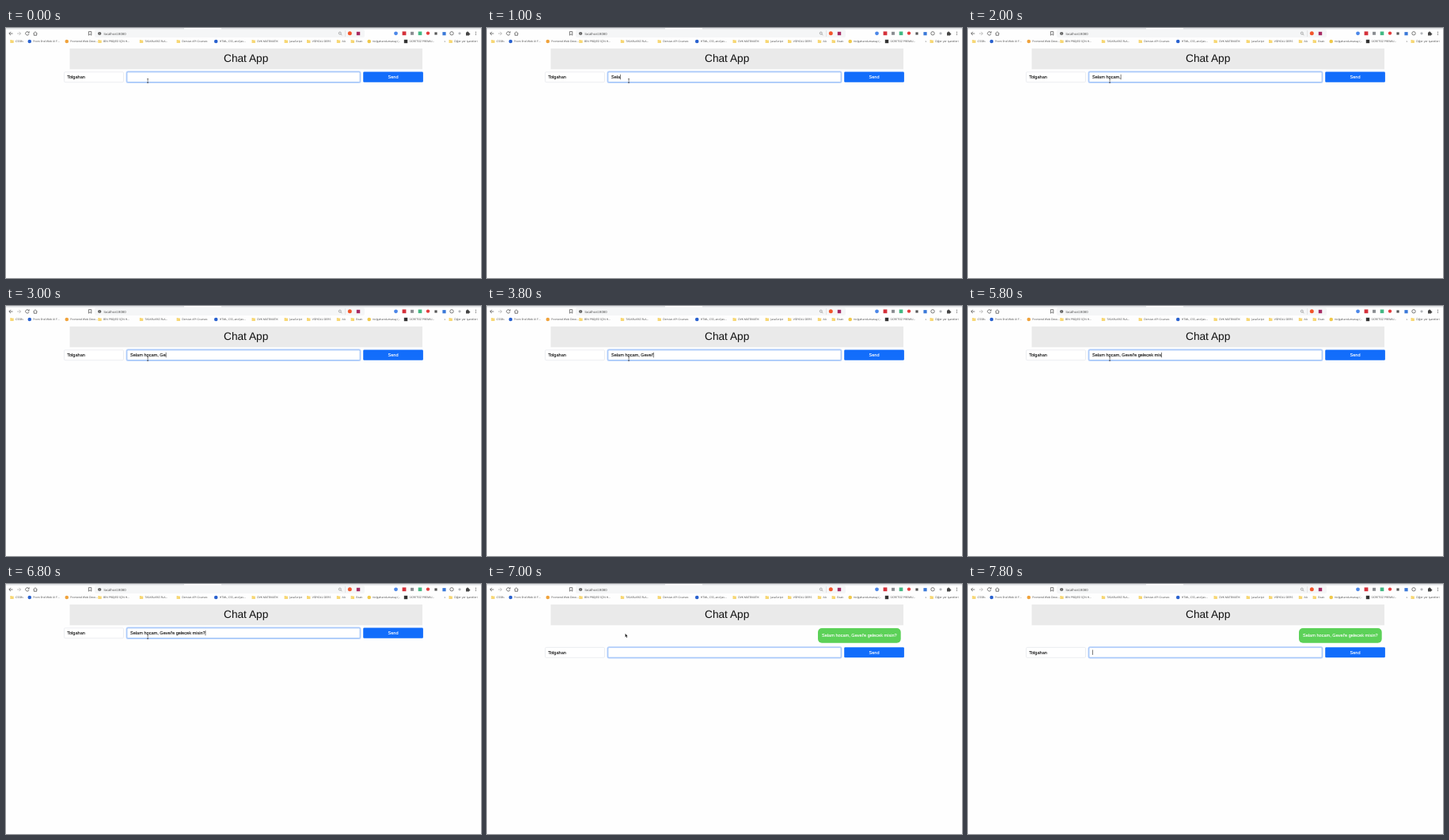
An HTML page for the animation above (8 s loop, 600x317 px).

```html
<!DOCTYPE html>
<html lang="tr">
<head>
<meta charset="utf-8">
<title>Chat App</title>
<style>
  html, body { margin: 0; width: 100%; height: 100%; overflow: hidden; background: #fefefe; }
  svg { display: block; width: 100%; height: 100%; }
  text { white-space: pre; text-rendering: geometricPrecision; }
  .app { font-family: "Liberation Sans", Arial, sans-serif; font-size: 5.6px; fill: #111; stroke: #111; stroke-width: .1px; }
  .title { font-size: 13.7px; stroke: none; }
  .light { fill: #fff; stroke: #fff; }
  .chrome { font-family: "Open Sans", "Noto Sans", sans-serif; font-size: 3.45px; fill: #444; }
  .url { font-size: 4.2px; }
  .line { fill: none; stroke: #444; stroke-width: .7px; }
</style>
</head>
<body>
<svg viewBox="0 0 600 317">
  <defs>
    <filter id="glow" x="-5%" y="-50%" width="110%" height="200%"><feGaussianBlur stdDeviation=".5"/></filter>
  </defs>
  <rect width="600" height="317" fill="#fefefe"/>
  <rect width="600" height="1.6" fill="#dfe1e5"/>
  <rect x="225" width="47" height="1.6" fill="#fff"/>
  <rect x="112" y="2" width="341" height="10" rx="2" fill="#f5f6f7"/>
  <g class="line">
    <path d="M8.5 7H4M6 4.8L3.8 7L6 9.2"/>
    <path d="M14 7h4.5M16.5 4.8L18.7 7l-2.2 2.2" stroke="#aaa"/>
    <path d="M28.5 5.4a2.2 2.2 0 1 0 .5 2M29.2 4.3v1.7h-1.7"/>
    <path d="M34.5 7L37 4.7L39.5 7M35.3 6.5v2.8h3.4V6.5"/>
    <path d="M104.4 4.6h3.4v4.6l-1.7-1.4l-1.7 1.4z"/>
    <circle cx="421.8" cy="6.6" r="1.5" stroke="#888"/>
    <path d="M422.9 7.7l1.5 1.5" stroke="#888"/>
    <path d="M428.5 3v8" stroke="#ddd"/>
  </g>
  <circle cx="118.2" cy="7" r="2.1" fill="#555"/>
  <path d="M118.2 6.7v1.5M118.2 5.5v.6" stroke="#fff" stroke-width=".6"/>
  <text class="chrome url" x="123.4" y="8.5">localhost:8080</text>
  <g id="tools"></g>
  <g id="marks" class="chrome"></g>

  <rect x="80.5" y="26" width="445.5" height="26.3" fill="#eaeaea"/>
  <text class="app title" x="275" y="42.6">Chat App</text>

  <g id="bubble">
    <rect x="418" y="56" width="104.7" height="18.8" rx="5" fill="#5cd158"/>
    <text class="app light" x="423" y="67.2" id="sent"></text>
  </g>
  <g id="form">
    <rect x="73.5" y="55.8" width="75" height="12.9" rx="1.3" fill="#fff" stroke="#dfe3e7" stroke-width=".6"/>
    <text class="app" x="77.2" y="64.1">Tolgahan</text>
    <rect x="152.5" y="55.5" width="295" height="13.5" rx="1.6" fill="none" stroke="#b5d0fb" stroke-width="1.8" filter="url(#glow)"/>
    <rect x="153" y="56" width="294" height="12.5" rx="1.2" fill="#fff" stroke="#8db9f7" stroke-width=".6"/>
    <text class="app" x="157" y="64.1" id="typed"></text>
    <rect id="caret" y="58.9" width=".6" height="6.4" fill="#222"/>
    <rect x="451.2" y="55.6" width="75.7" height="13.1" rx="1.3" fill="#126dfb"/>
    <text class="app light" x="482.5" y="64.1">Send</text>
  </g>
  <path id="beam" d="M178 64.6h2.2M179.1 64.6v4.9M178 69.5h2.2" fill="none" stroke="#333" stroke-width=".6"/>
  <path id="arrow" d="M174.6 62.8v4.6l1-.9l.8 1.8l.8-.4l-.8-1.7h1.4z" fill="#111" stroke="#fff" stroke-width=".2"/>
</svg>
<script>
const LOOP = 8000, STEP = 200, SENT = 7000;
const MESSAGE = "Selam hocam, Gevel'e gelecek misin?";
const KEYS = [[400, 0], [2000, 12], [2600, 13], [3800, 19], [5000, 27], [6200, 35]];
const $ = id => document.getElementById(id);

function add(parent, tag, attrs, text = "") {
  const el = document.createElementNS("http://www.w3.org/2000/svg", tag);
  for (const k in attrs) el.setAttribute(k, attrs[k]);
  el.textContent = text;
  parent.append(el);
  return el;
}

const dot = (g, x, y, r, fill) => add(g, "circle", { cx: x, cy: y, r, fill });
const box = (g, x, y, s, fill) => add(g, "rect", { x: x - s / 2, y: y - s / 2, width: s, height: s, fill });
const folder = (g, x) => add(g, "path", { d: `M${x - 2.2} 14.9h1.7l.6.7h2.1v3.4h-4.4z`, fill: "#f7d774" });

// Toolbar extensions
const tools = $("tools");
dot(tools, 434.3, 6.8, 2.5, "#f2562b");
box(tools, 445, 7, 4.4, "#a62a63");
dot(tools, 492.5, 6.8, 2.4, "#4c87e8");
box(tools, 503, 6.8, 4.8, "#d5303a");
box(tools, 513, 6.8, 4, "#8a8d91");
box(tools, 523, 6.8, 4.6, "#42b883");
dot(tools, 533, 6.6, 2.2, "#e23c3c");
box(tools, 543, 7, 3.2, "#555");
box(tools, 553.5, 7.2, 4.2, "#3978d8");
add(tools, "circle", { cx: 563, cy: 6.8, r: 2.2, class: "line" });
dot(tools, 573, 6.8, 1.6, "#b5b8bc");
add(tools, "path", { d: "M581 5.6h1.2a.9.9 0 1 1 1.7 0h1.2v1.2a.9.9 0 1 1 0 1.7v1h-4.1z", fill: "#444" });
[5, 6.8, 8.6].forEach(y => dot(tools, 593.5, y, .5, "#444"));

// Bookmarks: icon x, label, icon colour (folder when absent)
const marks = $("marks");
[
  [7.5, "CSSBs"],
  [29.8, "Front End Web UI F…", "#2a62cf"],
  [76.8, "Frontend Web Deve…", "#f0a33c"],
  [118.5, "BİN PROJESİ İÇİN H…"],
  [171, "TASARLARIZ RLA…"],
  [217.8, "Dersivo API Courses"],
  [265.2, "HTML, CSS, and Jav…", "#2a62cf"],
  [312.7, "DVK MATEMATİK"],
  [353.8, "JavaScript"],
  [382.2, "VİDYOLU DERS"],
  [420, "AA"],
  [437.8, "Eoatı"],
  [458.7, "ttolgahandumanay (…", "#f0c94a"],
  [505, "ÜCRETSİZ PREMIU…", "#333"],
  [561.7, "Diğer yer işaretleri"]
].forEach(([x, label, fill]) => {
  if (!fill) folder(marks, x);
  else if (fill === "#333") box(marks, x, 17, 4.4, fill);
  else dot(marks, x, 17, 2.3, fill);
  add(marks, "text", { x: x + 4.5, y: 18.2 }, label);
});
add(marks, "text", { x: 553.5, y: 18.2 }, "»");

function typedCount(t) {
  if (t <= KEYS[0][0]) return 0;
  for (let i = 1; i < KEYS.length; i++) {
    const [t0, n0] = KEYS[i - 1], [t1, n1] = KEYS[i];
    if (t <= t1) return Math.floor(n0 + (n1 - n0) * (t - t0) / (t1 - t0) + 1e-6);
  }
  return MESSAGE.length;
}

const show = (id, on) => $(id).setAttribute("visibility", on ? "visible" : "hidden");
$("sent").textContent = MESSAGE;

function draw(time) {
  const t = Math.floor(time % LOOP / STEP) * STEP;
  const sent = t >= SENT;
  const text = sent ? "" : MESSAGE.slice(0, typedCount(t));
  const typed = $("typed");
  typed.textContent = text;
  const width = text ? typed.getComputedTextLength() : 0;
  $("caret").setAttribute("x", 157 + width);
  $("form").setAttribute("transform", `translate(0 ${sent ? 24.6 : 0})`);
  show("caret", sent ? t >= 7600 : t >= 400);
  show("bubble", sent);
  show("beam", !sent);
  show("arrow", sent && t < 7400);
}

function tick() {
  draw(performance.now());
  requestAnimationFrame(tick);
}
tick();
</script>
</body>
</html>
```
